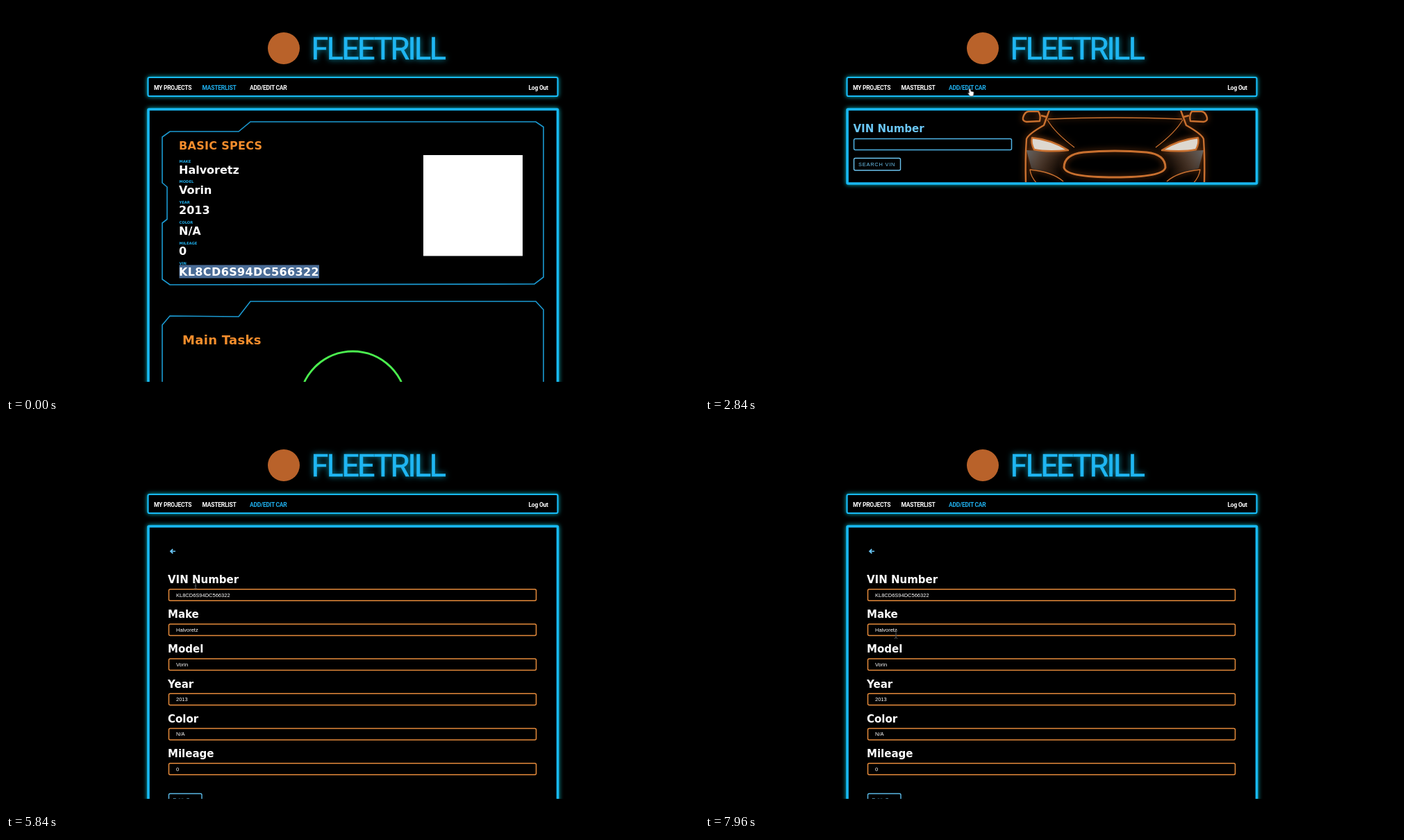
An HTML page that plays this animation: 998x561 px, repeating every 8 s.

```html
<!DOCTYPE html>
<html lang="en">
<head>
<meta charset="utf-8">
<title>Garage tracker</title>
<style>
  html, body { margin: 0; width: 100%; height: 100%; overflow: hidden; background: #000; }
  svg { display: block; width: 998px; height: 561px; }
  text { font-family: "DejaVu Sans", sans-serif; fill: #fff; white-space: pre; }

  .brand { font: 400 45px Roboto, sans-serif; letter-spacing: -2.7px; fill: #1fb6f2;
    stroke: #1fb6f2; stroke-width: .6; filter: drop-shadow(0 0 4px #0a8fa8); }
  .nav text { font: 700 8.5px Roboto, sans-serif; letter-spacing: -.25px; }
  .frame { fill: #000; stroke: #18b9f5; filter: drop-shadow(0 0 3px #0bb3bd); }
  .panel { fill: none; stroke: #1b9ad2; stroke-width: 1.6; }
  .title { font-weight: 700; fill: #f58d2c; letter-spacing: .3px; }
  .tag { font-size: 5.2px; font-weight: 700; fill: #1fb0ee; }
  .value { font-size: 16px; font-weight: 700; }
  .vin { letter-spacing: .38px; }
  .head { font-size: 15px; font-weight: 700; }
  .field { fill: #000; stroke: #e58a3b; stroke-width: 1.5; }
  .entry { font: 7.5px "Liberation Sans", Arial, sans-serif; }
  .typed { font: 700 7.35px "Liberation Mono", monospace; }
  .btn { font: 7.4px "Liberation Sans", Arial, sans-serif; letter-spacing: .8px; }
  .car { fill: none; stroke: #c9702f; stroke-width: 2.4; stroke-linejoin: round;
    filter: drop-shadow(0 0 4px #8a4314); }

  /* 1% = 80 ms */
  .on { opacity: 0; }
  .on, .step { animation: 8s step-end infinite; }
  #specs { animation-name: specs; }
  #search { animation-name: search; }
  #edit { animation-name: edit; }
  #list { animation-name: list; }
  #add { animation-name: add; }
  #box { animation-name: focus; fill: #000; stroke-width: 1.5; }
  #caretA { animation-name: caretA; }
  #caretB { animation-name: caretB; }
  #typed { animation-name: pasted; }
  #go { animation-name: hover; }
  #arrow { animation-name: arrow; }
  #hand { animation-name: hand; }
  #beam { animation-name: beam; }
  #cursor { animation: move 8s linear infinite; }

  @keyframes specs { 0% { opacity: 1 } 35.5%, 100% { opacity: 0 } }
  @keyframes search { 0% { opacity: 0 } 35.5% { opacity: 1 } 71.5%, 100% { opacity: 0 } }
  @keyframes edit { 0% { opacity: 0 } 71.5%, 100% { opacity: 1 } }
  @keyframes list { 0% { fill: #1fb0ee } 35.5%, 100% { fill: #fff } }
  @keyframes add {
    0% { fill: #fff; filter: none }
    27.5% { fill: #fff; filter: drop-shadow(0 0 1.5px #5cc4f5) }
    35.5%, 100% { fill: #1fb0ee; filter: none }
  }
  @keyframes focus { 0% { stroke: #4fb4e6 } 43% { stroke: #e58a3b } 62%, 100% { stroke: #4fb4e6 } }
  @keyframes caretA { 0% { opacity: 0 } 43% { opacity: 1 } 52%, 100% { opacity: 0 } }
  @keyframes caretB { 0% { opacity: 0 } 52% { opacity: 1 } 55.5%, 100% { opacity: 0 } }
  @keyframes pasted { 0% { opacity: 0 } 52%, 100% { opacity: 1 } }
  @keyframes hover { 0% { color: #6cc4f0 } 61.5%, 100% { color: #fff } }
  @keyframes arrow {
    0% { opacity: 0 } 5% { opacity: 1 } 27% { opacity: 0 }
    40% { opacity: 1 } 44%, 100% { opacity: 0 }
  }
  @keyframes hand {
    0% { opacity: 0 } 27% { opacity: 1 } 40% { opacity: 0 }
    61% { opacity: 1 } 71.5%, 100% { opacity: 0 }
  }
  @keyframes beam {
    0% { opacity: 0 } 1% { opacity: 1 } 5% { opacity: 0 }
    44% { opacity: 1 } 61% { opacity: 0 } 71.5%, 100% { opacity: 1 }
  }
  @keyframes move {
    0%, 1% { transform: translate(452px, 384px) }
    10.5%, 21% { transform: translate(461px, 388px) }
    23%, 25.5% { transform: translate(418px, 235px) }
    28%, 32% { transform: translate(383px, 121px) }
    32.5%, 39% { transform: translate(381.5px, 119px) }
    46%, 48% { transform: translate(339px, 200px) }
    48.5%, 59.5% { transform: translate(339px, 201px) }
    62%, 68% { transform: translate(274px, 235.5px) }
    71.5%, 75.5% { transform: translate(273px, 233.5px) }
    81%, 83.5% { transform: translate(274px, 262px) }
    85.5%, 90.5% { transform: translate(274px, 280px) }
    99.5%, 100% { transform: translate(275px, 305px) }
  }
</style>
</head>
<body>
<svg viewBox="0 0 998 561">
  <defs>
    <clipPath id="view"><rect width="998" height="542"/></clipPath>
    <clipPath id="banner"><rect x="207" y="151" width="585" height="103"/></clipPath>
    <linearGradient id="fender" x2="1" y2=".4">
      <stop stop-color="#666"/><stop offset="1" stop-color="#222" stop-opacity="0"/>
    </linearGradient>
    <g id="side">
      <path d="M463 208L523 211Q508 224 512 248L470 234Z" fill="url(#fender)" stroke="none"/>
      <path d="M458 161Q460 153 466 152H480Q484 158 482 166L463 167Q457 166 458 161Z"/>
      <path d="M496 150L488 172Q465 185 463 192Q461 220 462 256M484 158L492 160"/>
      <path d="M493 164Q503 182 532 204" stroke-width="1.3"/>
      <path d="M471 190Q500 193 523 208Q492 211 474 207Q469 198 471 190Z" fill="#ddd8d0"/>
      <path d="M478 256Q469 246 468 236Q500 239 516 253" stroke-width="1.4"/>
    </g>
  </defs>

  <circle cx="400" cy="61" r="23" fill="#b9622a"/>
  <text class="brand" x="439.500" y="77">FLEETRILL</text>

  <g class="nav">
    <rect class="frame" x="204.5" y="103" width="590" height="27" rx="2" stroke-width="2.2"/>
    <text x="213" y="120.5">MY PROJECTS</text>
    <text x="282.5" y="120.5" id="list" class="step">MASTERLIST</text>
    <text x="351" y="120.5" id="add" class="step">ADD/EDIT CAR</text>
    <text x="752.5" y="120.5">Log Out</text>
  </g>

  <g clip-path="url(#view)">
    <g id="specs" class="on">
      <rect class="frame" x="205" y="149" width="589.5" height="450" rx="1" stroke-width="3.6"/>
      <path class="panel" d="M236 181H335L352 167H763L774 174.500V391L761 401L236 402L225 394V313L232 307.500V261L225 255V189Z"/>
      <path class="panel" d="M225 560V460L236 447L335 448L352 426H763L774 438V560"/>
      <text class="title" x="249" y="207" font-size="16">BASIC SPECS</text>
      <rect x="249.500" y="373.500" width="201.500" height="19" fill="#4a6c96"/>
      <g id="rows"></g>
      <rect x="601" y="215" width="143" height="145.500" fill="#fff"/>
      <text class="title" x="254" y="487.500" font-size="18">Main Tasks</text>
      <circle cx="499.500" cy="575" r="77" fill="none" stroke="#4bf04f" stroke-width="3"/>
    </g>

    <g id="search" class="on">
      <rect class="frame" x="205" y="149" width="589.5" height="107" rx="1" stroke-width="3.6"/>
      <g clip-path="url(#banner)">
        <g class="car">
          <use href="#side"/>
          <use href="#side" transform="matrix(-1 0 0 1 1181 0)"/>
          <path d="M494 163Q590 159 687 163" stroke-width="1.6"/>
          <path d="M517 233Q517 214 545 211Q590 207 636 211Q663 214 663 233Q660 247 590 247Q520 247 517 233Z" stroke-width="3"/>
        </g>
      </g>
      <text class="head" x="213.500" y="182" style="fill:#6ac6f5">VIN Number</text>
      <rect id="box" class="step" x="214.500" y="191.500" width="227" height="16" rx="2"/>
      <text id="typed" class="typed on" x="225" y="202">KL8CD6S94DC566322</text>
      <path id="caretA" class="on" d="M225.500 195V204" stroke="#fff" stroke-width=".9"/>
      <path id="caretB" class="on" d="M300.500 195V204" stroke="#fff" stroke-width=".9"/>
      <g id="go" class="step">
        <rect x="214.500" y="219.500" width="67" height="17.500" rx="2" stroke="currentColor" stroke-width="1.4"/>
        <text class="btn" x="221" y="230.700" style="fill:currentColor">SEARCH VIN</text>
      </g>
    </g>

    <g id="edit" class="on">
      <rect class="frame" x="205" y="149" width="589.5" height="450" rx="1" stroke-width="3.6"/>
      <path d="M244 185H238M240.300 182L237 185L240.300 188" fill="none" stroke="#6ac6f5" stroke-width="1.700"/>
      <g id="fields"></g>
      <rect x="234.500" y="534.500" width="47.500" height="18" rx="2" stroke="#5bbbe8" stroke-width="1.4"/>
      <text class="btn" x="240.500" y="546" style="fill:#6ac6f5">Edit Car</text>
    </g>
  </g>

  <g id="cursor">
    <path id="arrow" class="on" d="M0 0V9.500L2.200 7.500L3.800 11L5.300 10.300L3.800 7H6.500Z" stroke="#ddd" stroke-width=".9"/>
    <path id="hand" class="on" d="M-.8 .2Q0 -.8 .8 .2L1.500 4L4.800 4.600Q6 5 5.600 7L4.800 11H0L-3 6.800Q-2.800 5.400 -1 6.600L-1.600 2Z" fill="#fff" stroke="#222" stroke-width=".6"/>
    <path id="beam" class="on" d="M-2.300 -5.500Q0 -5.500 0 -4V4Q0 5.500 -2.300 5.500M2.300 -5.500Q0 -5.500 0 -4M0 4Q0 5.500 2.300 5.500M-1.300 1.500H1.300" fill="none" stroke="#666" stroke-width=".9"/>
  </g>
</svg>
<script>
  const car = [
    ["Make", "Halvoretz"], ["Model", "Vorin"], ["Year", "2013"],
    ["Color", "N/A"], ["Mileage", "0"], ["VIN", "KL8CD6S94DC566322"]
  ];
  const label = (cls, x, y, str) => `<text class="${cls}" x="${x}" y="${y}">${str}</text>`;
  const fill = (id, list, draw) => {
    document.getElementById(id).innerHTML = list.map(draw).join("");
  };

  fill("rows", car, ([name, value], i) => {
    const y = 226 + 29.4 * i;
    return label("tag", 249.5, y, name.toUpperCase()) +
      label(name === "VIN" ? "value vin" : "value", 249, y + 15.6, value);
  });

  const form = [["VIN Number", car[5][1]], ...car.slice(0, 5)];
  fill("fields", form, ([name, value], i) => {
    const y = 231 + 50.2 * i;
    return label("head", 233, y, name) +
      `<rect class="field" x="234.5" y="${y + 8.7}" width="529" height="16.5" rx="2"/>` +
      label("entry", 245, y + 19.6, value);
  });
</script>
</body>
</html>
```
